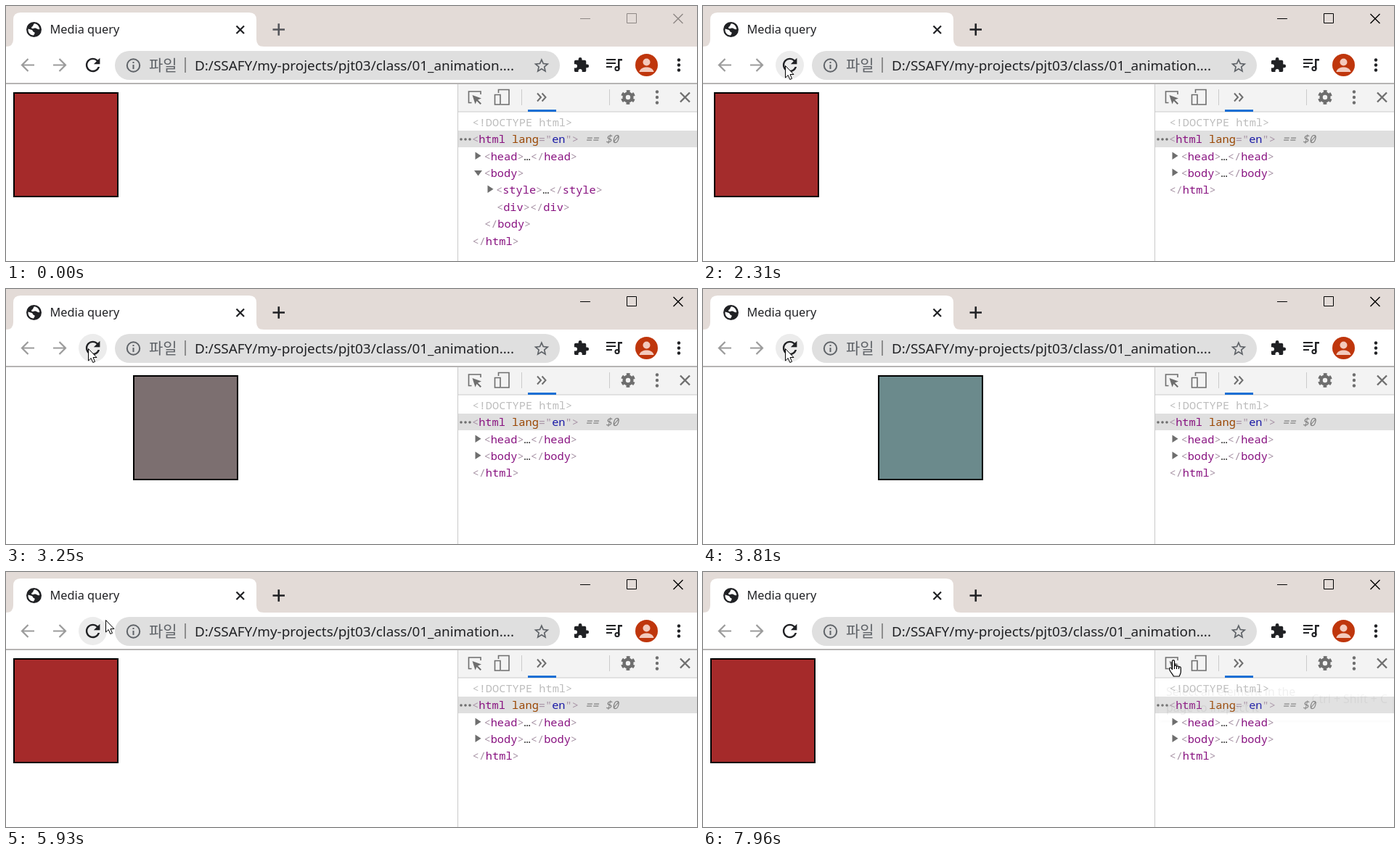
Recreate the animation shown at these times as an HTML page. Size 952x352 px, loop 8 s.

```html
<!DOCTYPE html>
<html lang="en">
<head>
<meta charset="utf-8">
<title>Media query</title>
<style>
  html, body { margin: 0; width: 100%; height: 100%; overflow: hidden; background: #fff; }
  svg { position: absolute; left: 0; top: 0; width: 952px; height: 352px; }
  text { font-family: "Noto Sans", "Open Sans", sans-serif; white-space: pre; }
  .line { fill: none; stroke: currentColor; }
  .ink { color: #202124; fill: #202124; }
  .tool { color: #6e6e6e; fill: #6e6e6e; }
  .code text { font: 15.3px "Noto Sans Mono", "DejaVu Sans Mono", monospace; fill: #a894a6; }
  .code .tag { fill: #881280; }
  .code .name { fill: #994500; }
  .code .value { fill: #1a1aa6; }
  .code .note { fill: #808080; font-style: italic; }

  .box {
    position: absolute; left: 10px; top: 119px; width: 145px; height: 145px;
    box-sizing: border-box; border: 2px solid #000; background: brown;
    animation: slide 8s infinite linear;
  }
  @keyframes slide {
    0%, 27.775% { left: 10px; background: brown; animation-timing-function: ease; }
    65.275%, 66.249% { left: 288.4px; background: cadetblue; }
    66.25%, 100% { left: 10px; background: brown; }
  }

  .controls { animation: controls 8s infinite step-end; }
  @keyframes controls { 0% { color: #8d8784; } 24.875%, 100% { color: #000; } }
  .plus { animation: plus 8s infinite step-end; }
  @keyframes plus { 0% { color: #55565b; } 24.875%, 100% { color: #202124; } }

  .expanded { animation: expanded 8s infinite step-end; }
  @keyframes expanded { 0% { opacity: 1; } 26.875%, 100% { opacity: 0; } }
  .collapsed { animation: collapsed 8s infinite step-end; }
  @keyframes collapsed { 0% { opacity: 0; } 26.875%, 100% { opacity: 1; } }

  .hover { animation: hover 8s infinite step-end; }
  @keyframes hover {
    0% { opacity: 0; } 19.125% { opacity: .15; }
    24.875% { opacity: 1; } 83.5%, 100% { opacity: 0; }
  }

  .pointer { animation: move 8s infinite linear; }
  @keyframes move {
    0%, 9.125% { transform: translate(431px, 298px); animation-timing-function: cubic-bezier(.3, .3, .5, 1); }
    19.125% { transform: translate(99px, 76px); }
    20% { transform: translate(108px, 80px); }
    23%, 70.5% { transform: translate(113px, 82px); }
    74.125%, 82% { transform: translate(137px, 66px); animation-timing-function: cubic-bezier(.4, .1, .5, 1); }
    92.5% { transform: translate(646px, 117px); }
    93.5%, 96.5% { transform: translate(647px, 115px); }
    98.375%, 99.499% { transform: translate(642px, 104px); }
    99.5%, 100% { transform: translate(648px, 121px); }
  }
  .arrow { animation: arrow 8s infinite step-end; }
  @keyframes arrow {
    0% { opacity: 0; } 9.125% { opacity: 1; } 91.5% { opacity: 0; }
    98.375% { opacity: 1; } 99.5%, 100% { opacity: 0; }
  }
  .hand { animation: hand 8s infinite step-end; }
  @keyframes hand {
    0% { opacity: 0; } 91.5% { opacity: 1; }
    98.375% { opacity: 0; } 99.5%, 100% { opacity: 1; }
  }

  .tooltip { animation: tooltip 8s infinite linear; }
  @keyframes tooltip {
    0%, 92.25% { opacity: 0; }
    94.5%, 98.1% { opacity: 1; }
    99.5%, 100% { opacity: .07; }
  }
  .card { filter: drop-shadow(0 1px 2px rgba(0, 0, 0, .3)); }
</style>
</head>
<body>
<svg viewBox="0 0 952 352">
  <!-- tab strip -->
  <path fill="#e3dbd7" d="M0 0H952V56H0z"/>
  <path fill="#fff" d="M0 56Q10 56 10 46V19Q10 9 20 9H335Q345 9 345 19V46Q345 56 355 56z"/>
  <circle class="ink" cx="38.5" cy="32.5" r="10.5"/>
  <path fill="#fff" d="M30.5 31.5l5 1.5c2 1 1 2.5 3 3 2 .6 1 2.5-.5 4.5-5-.2-8-4-7.5-9zM39 24.3c4 .2 7 4 7.3 7.5-2 1.5-3.500-.8-5.500-1.300-2-.4-3.500 1.500-5.300.2-1.500-1.500 1-2.200 1.600-3.200.6-1 .5-2 1.900-3.200z"/>
  <text class="ink" x="60.5" y="38" font-size="16.3">Media query</text>
  <path class="line" color="#202124" stroke-width="2.2" d="M317.5 27.500l10.500 10.500m0-10.500l-10.500 10.500"/>
  <path class="line plus" stroke-width="2.6" d="M367.5 32.500h16.500m-8.250-8.250v16.500"/>
  <g class="line controls">
    <path d="M791 17.500h14M855.500 10.500h13v13h-13z"/>
    <path stroke-width="1.400" d="M919.500 11l13 13m0-13l-13 13"/>
  </g>

  <!-- toolbar -->
  <g class="line" color="#9b9b9b" stroke-width="2.2">
    <path d="M39 81.500H22m8.500-8.500l-8.500 8.500 8.500 8.500"/>
    <path d="M65 81.500h17m-8.500-8.500l8.500 8.500-8.500 8.500"/>
  </g>
  <circle class="hover" cx="119.5" cy="81.5" r="19.5" fill="#ececec"/>
  <path class="ink" transform="translate(105 66.8) scale(1.22)" d="M17.65 6.35C16.2 4.9 14.21 4 12 4c-4.42 0-8 3.58-8 8s3.58 8 8 8c3.73 0 6.84-2.55 7.73-6h-2.08c-.82 2.33-3.04 4-5.65 4-3.31 0-6-2.69-6-6s2.69-6 6-6c1.66 0 3.14.69 4.22 1.78L13 11h7V4z"/>
  <rect x="150" y="62" width="613" height="40" rx="20" fill="#dfdfdf"/>
  <g color="#5f6368" fill="#5f6368">
    <circle class="line" cx="175.5" cy="82" r="8.7" stroke-width="2"/>
    <path d="M174.5 81h2v6h-2zM174.5 77h2v2h-2z"/>
    <text x="197" y="88.5" font-size="21" style="font-family:'Noto Sans CJK KR','Noto Sans CJK',sans-serif">파일</text>
    <path fill="#8d8d8d" d="M246 71h2v21h-2z"/>
    <path fill-rule="evenodd" transform="translate(725.4 69.8) scale(1.04)" d="M22 9.24l-7.19-.62L12 2 9.19 8.63 2 9.24l5.46 4.73L5.82 21 12 17.27 18.18 21l-1.63-7.03zM12 15.4l-3.76 2.27 1-4.28-3.32-2.88 4.38-.38L12 6.1l1.71 4.04 4.38.38-3.32 2.88 1 4.28z"/>
  </g>
  <text class="ink" x="260" y="89" font-size="18.92">D:/SSAFY/my-projects/pjt03/class/01_animation....</text>
  <g class="ink">
    <path transform="translate(781 70) scale(.96)" d="M20.5 11H19V7c0-1.1-.9-2-2-2h-4V3.5a2.5 2.5 0 0 0-5 0V5H4c-1.1 0-2 .9-2 2v3.8h1.5a2.7 2.7 0 0 1 0 5.4H2V20c0 1.1.9 2 2 2h3.8v-1.5a2.7 2.7 0 0 1 5.4 0V22H17c1.1 0 2-.9 2-2v-4h1.5a2.5 2.5 0 0 0 0-5z"/>
    <path d="M827 73h13v2h-13zM827 78h13v2h-13zM827 83h8v2h-8zM843 73h6v2.5h-3.5V87H843z"/>
    <circle class="line" cx="842" cy="86.5" r="2.6" stroke-width="2"/>
    <circle cx="927" cy="74.5" r="2.2"/><circle cx="927" cy="81.5" r="2.2"/><circle cx="927" cy="88.5" r="2.2"/>
  </g>
  <circle cx="882.5" cy="81.5" r="15.5" fill="#bf360c"/>
  <g fill="#f3cabd">
    <circle cx="882.5" cy="77.5" r="5"/>
    <path d="M872.5 91c1-5 6-6.5 10-6.5s9 1.5 10 6.5z"/>
  </g>
  <path fill="#b6b4b3" d="M0 106H952V108H0z"/>

  <!-- inspector -->
  <path fill="#f3f3f3" d="M623 108H952V146H623z"/>
  <path fill="#cbcbcb" d="M622 108h1V352h-1zM623 145.5H952v1H623zM710 115h1v22h-1zM831 115h1v22h-1z"/>
  <path fill="#1a6fd4" d="M719 143h39v3h-39z"/>
  <g class="tool">
    <g transform="translate(-.5 0)">
      <path class="line" stroke-width="1.6" d="M642 133.5h-4v-15.5h16.5v4"/>
      <path d="M643 123l12.5 4.5-5 2 5 5-1.5 1.5-5-5-2 4.5z"/>
      <path class="line" stroke-width="1.6" d="M679 120v-4.5h14.5v20.5h-11M674 122.5h7.5v13.5H674z"/>
    </g>
    <path class="line" stroke-width="2" d="M732 120.5l5 5.5-5 5.5m6.5-11l5 5.5-5 5.5"/>
    <circle class="line" cx="857" cy="126" r="5.4" stroke-width="4.4"/>
    <circle class="line" cx="857" cy="126" r="8.2" stroke-width="3.4" stroke-dasharray="4.6 3.987" stroke-dashoffset="2.3" transform="rotate(30 857 126)"/>
    <circle cx="897" cy="118.5" r="2.2"/><circle cx="897" cy="126" r="2.2"/><circle cx="897" cy="133.5" r="2.2"/>
    <path class="line" stroke-width="2.3" d="M929 119.5l13 13m0-13l-13 13"/>
  </g>
  <path fill="#dfdfdf" d="M623 172H952V195H623z"/>
  <g class="tool">
    <circle cx="627" cy="184" r="1.8"/><circle cx="633" cy="184" r="1.8"/><circle cx="639" cy="184" r="1.8"/>
    <path d="M646.5 201.5v10.5l8-5.25z"/>
  </g>
  <g class="code">
    <text x="642.5" y="165.7" style="fill:#bdbdbd">&lt;!DOCTYPE html&gt;</text>
    <text x="642" y="189">&lt;<tspan class="tag">html</tspan> <tspan class="name">lang</tspan>="<tspan class="value">en</tspan>"&gt; <tspan class="note">== $0</tspan></text>
    <text x="658.5" y="212.5">&lt;<tspan class="tag">head</tspan>&gt;<tspan fill="#333">…</tspan>&lt;/<tspan class="tag">head</tspan>&gt;</text>
    <g class="expanded">
      <path class="tool" d="M645 227h11l-5.5 7.5zM663.5 247.5v10.5l8-5.25z"/>
      <text x="658.5" y="236">&lt;<tspan class="tag">body</tspan>&gt;</text>
      <text x="675" y="259">&lt;<tspan class="tag">style</tspan>&gt;<tspan fill="#333">…</tspan>&lt;/<tspan class="tag">style</tspan>&gt;</text>
      <text x="676" y="282.5">&lt;<tspan class="tag">div</tspan>&gt;&lt;/<tspan class="tag">div</tspan>&gt;</text>
      <text x="659" y="306">&lt;/<tspan class="tag">body</tspan>&gt;</text>
      <text x="642.5" y="329.5">&lt;/<tspan class="tag">html</tspan>&gt;</text>
    </g>
    <g class="collapsed">
      <path class="tool" d="M646.5 224.5v10.5l8-5.25z"/>
      <text x="658.5" y="235.5">&lt;<tspan class="tag">body</tspan>&gt;<tspan fill="#333">…</tspan>&lt;/<tspan class="tag">body</tspan>&gt;</text>
      <text x="642.5" y="259">&lt;/<tspan class="tag">html</tspan>&gt;</text>
    </g>
  </g>
</svg>

<div class="box"></div>

<svg viewBox="0 0 952 352">
  <g class="tooltip" font-size="15.8">
    <rect class="card" x="628" y="148" width="322" height="57" rx="2" fill="#fff"/>
    <text x="638" y="171" fill="#333">Select an element in the</text>
    <text x="638" y="193" fill="#333">page to inspect it</text>
    <text x="943" y="181" fill="#666" text-anchor="end">Ctrl + Shift + C</text>
  </g>
  <g class="pointer" fill="#fff" stroke="#000" stroke-linejoin="round">
    <path class="arrow" d="M.5.5V17l3.7-3.5L6.8 19.5l2.7-1.2L7 12.5h5z"/>
    <path class="hand" transform="translate(-7 0)" stroke-width="1.2" d="M5.5 2.2c0-2.2 3-2.2 3 0v6.8c.3-1.5 3-1.5 3 .5.5-1.3 3-1 3 1 .5-1 2.8-.8 2.8 1v5c0 3-1.5 4-2 6.5h-8c-.5-2-3-4.5-4.8-7.5-1.8-3-1-4.5.3-4.5s2 1 2.7 2.5zM8.5 9v4m3-3.5V13m3-2.5V13"/>
  </g>
</svg>
</body>
</html>
```
